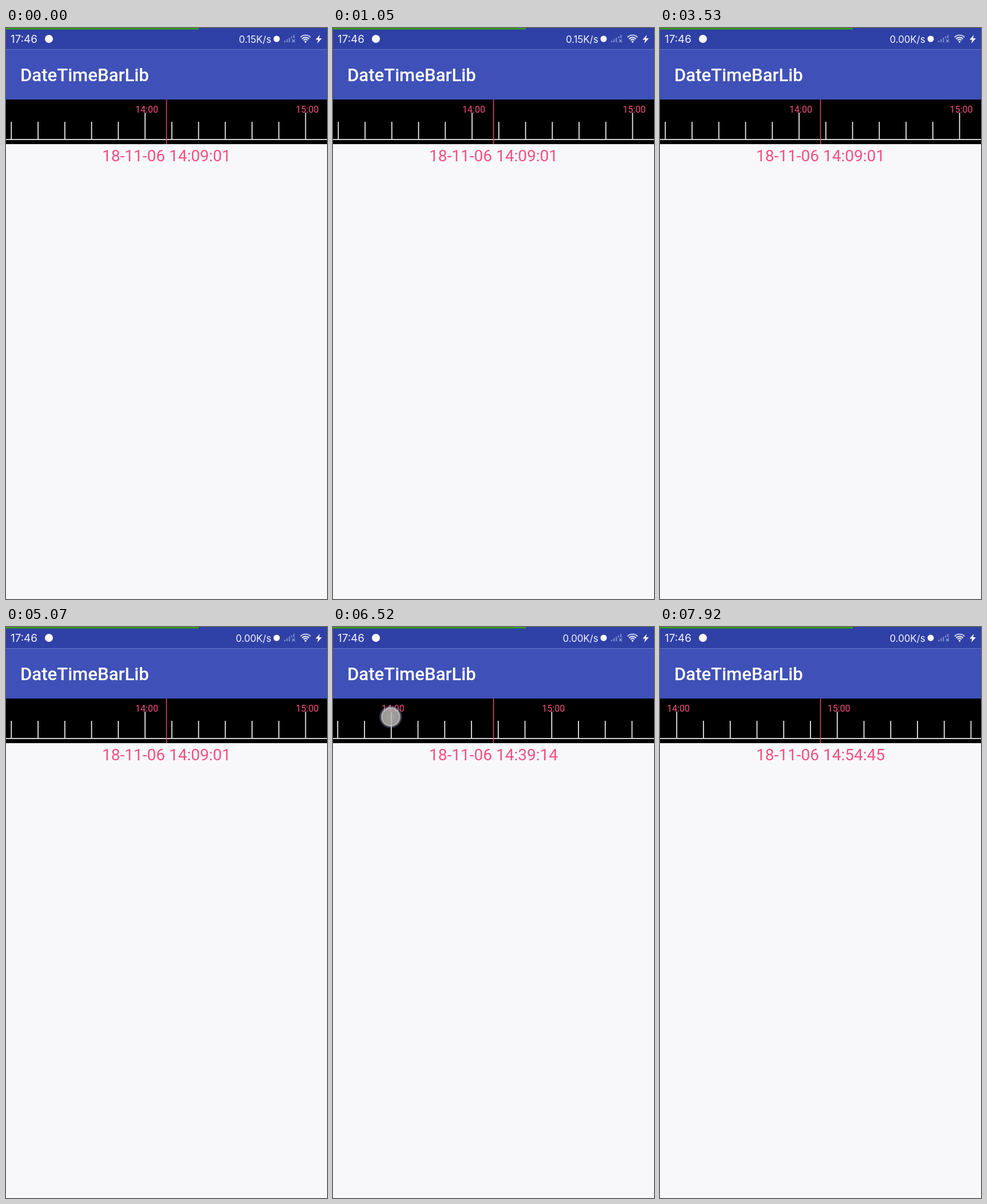
Recreate the animation shown at these times as an HTML page with a canvas. Size 561x998 px, loop 8 s.

```html
<!DOCTYPE html>
<html lang="en">
<head>
<meta charset="utf-8">
<title>DateTimeBarLib</title>
<style>
html, body { margin: 0; width: 100%; height: 100%; overflow: hidden; background: #f8f8fb; }
canvas { display: block; width: 561px; height: 998px; }
</style>
</head>
<body>
<canvas id="stage"></canvas>
<script>
const W = 561, H = 998, LOOP = 8000;
const HOUR = W / 2, ORIGIN = 285.2, AXIS = 195;
const PINK = '#f5507f';
const canvas = document.getElementById('stage');
const ctx = canvas.getContext('2d');
const ratio = window.devicePixelRatio || 1;
canvas.width = Math.round(W * ratio);
canvas.height = Math.round(H * ratio);

// [time, seconds past 14:00]
const scroll = [[5560, 541], [5760, 690], [6060, 1161], [6520, 2352], [6900, 2960], [7380, 3285]];
// [time, x] and [time, y] of the touch point
const touchX = [[5560, 248], [5760, 235], [6060, 198], [6520, 101], [6900, 56], [7380, 33]];
const touchY = [[5560, 185], [6060, 180], [6520, 157], [6900, 158], [7380, 170]];
const TOUCH_ON = 5480, TOUCH_OFF = 7740;

const clamp = (v, a, b) => Math.min(b, Math.max(a, v));

// Smooth curve through the keys, flat at both ends
function curve(keys, t) {
  const last = keys.length - 1;
  if (t <= keys[0][0]) return keys[0][1];
  if (t >= keys[last][0]) return keys[last][1];
  const i = keys.findIndex(k => k[0] > t) - 1;
  const slope = j => {
    if (j === 0 || j === last) return 0;
    const before = (keys[j][1] - keys[j - 1][1]) / (keys[j][0] - keys[j - 1][0]);
    const after = (keys[j + 1][1] - keys[j][1]) / (keys[j + 1][0] - keys[j][0]);
    return before * after <= 0 ? 0 : 2 * before * after / (before + after);
  };
  const [t0, a] = keys[i], [t1, b] = keys[i + 1];
  const d = t1 - t0, u = (t - t0) / d, u2 = u * u, u3 = u2 * u;
  return a * (2 * u3 - 3 * u2 + 1) + b * (3 * u2 - 2 * u3)
    + d * (slope(i) * (u3 - 2 * u2 + u) + slope(i + 1) * (u3 - u2));
}

function rect(x, y, w, h, color) {
  ctx.fillStyle = color;
  ctx.fillRect(x, y, w, h);
}

function text(str, x, y, font, color, align = 'left') {
  ctx.font = font;
  ctx.fillStyle = color;
  ctx.textAlign = align;
  ctx.fillText(str, x, y);
}

function dot(x, y, r, color) {
  ctx.fillStyle = color;
  ctx.beginPath();
  ctx.arc(x, y, r, 0, Math.PI * 2);
  ctx.fill();
}

function signal() {
  const dim = '#7481c6';
  for (let i = 0; i < 5; i++) {
    const h = 3 + i * 2.5;
    rect(486 + i * 4, 25 - h, 2.4, i > 2 ? h - 7 : h, dim);
  }
  ctx.strokeStyle = '#9aa4d8';
  ctx.lineWidth = 1.3;
  ctx.beginPath();
  ctx.moveTo(500, 20);
  ctx.lineTo(505, 25);
  ctx.moveTo(505, 20);
  ctx.lineTo(500, 25);
  ctx.stroke();
}

function wifi() {
  const x = 523.5, y = 25, a = Math.PI * 0.25;
  ctx.lineWidth = 2;
  for (const [r, color] of [[12.4, '#c9cfec'], [8.6, '#fff'], [4.9, '#fff']]) {
    ctx.strokeStyle = color;
    ctx.beginPath();
    ctx.arc(x, y, r, -Math.PI + a, -a);
    ctx.stroke();
  }
  dot(x, y - 1, 1.7, '#fff');
}

function bolt() {
  ctx.fillStyle = '#fff';
  ctx.beginPath();
  ctx.moveTo(548.5, 12);
  ctx.lineTo(541, 20.5);
  ctx.lineTo(545.7, 20.5);
  ctx.lineTo(544, 27);
  ctx.lineTo(552, 18);
  ctx.lineTo(547, 18);
  ctx.closePath();
  ctx.fill();
}

function header(t) {
  rect(0, 0, W, 37.5, '#2f40a6');
  rect(0, 37.5, W, 87.5, '#3f51b8');
  rect(0, 0, 337, 2.6, '#35a010');
  text('17:46', 8, 26.3, '18.8px Inter, sans-serif', '#f4f5fc');
  dot(75, 19, 7, '#fff');
  text(t < 1240 ? '0.15K/s' : '0.00K/s', 463.5, 25.8, '16.8px Inter, sans-serif', '#f4f5fc', 'right');
  dot(473, 19, 5.5, '#fff');
  signal();
  wifi();
  bolt();
  text('DateTimeBarLib', 24.9, 93, '500 31.17px Roboto, sans-serif', '#fff');
}

function ruler(seconds) {
  rect(0, 125, W, 78, '#000');
  const start = ORIGIN - seconds / 3600 * HOUR;
  for (let i = -6; i <= 12; i++) {
    const x = start + i * HOUR / 6;
    const top = i % 6 ? 164 : 148;
    rect(x - 0.85, top, 1.7, AXIS - top, '#f2f2f2');
    if (i % 6 === 0) text(14 + i / 6 + ':00', x - 17, 148.3, '16px Roboto, sans-serif', PINK);
  }
  rect(0, AXIS - 1, W, 1.7, '#f2f2f2');
  rect(279.7, 125, 1.6, 78, '#d9486d');
}

function touch(t) {
  const alpha = clamp((t - TOUCH_ON) / 60, 0, 1) * clamp((TOUCH_OFF - t) / 60, 0, 1);
  if (!alpha) return;
  const x = curve(touchX, t), y = curve(touchY, t), r = 21;
  const glow = ctx.createRadialGradient(x, y, 0, x, y, r);
  glow.addColorStop(0, 'rgba(190,188,182,.86)');
  glow.addColorStop(0.64, 'rgba(180,178,174,.86)');
  glow.addColorStop(0.75, 'rgba(214,214,216,.86)');
  glow.addColorStop(0.82, 'rgba(170,174,200,.5)');
  glow.addColorStop(1, 'rgba(120,130,190,0)');
  ctx.globalAlpha = alpha;
  dot(x, y, r, glow);
  ctx.globalAlpha = 1;
}

function draw(t) {
  const seconds = Math.round(curve(scroll, t));
  const two = n => String(n).padStart(2, '0');
  ctx.setTransform(ratio, 0, 0, ratio, 0, 0);
  rect(0, 0, W, H, '#f8f8fb');
  header(t);
  ruler(seconds);
  const clock = `14:${two(Math.floor(seconds / 60))}:${two(seconds % 60)}`;
  text('18-11-06 ' + clock, W / 2, 233, '28.05px Roboto, sans-serif', PINK, 'center');
  touch(t);
}

const begin = performance.now();
function tick() {
  draw((performance.now() - begin) % LOOP);
  requestAnimationFrame(tick);
}
tick();
</script>
</body>
</html>
```
